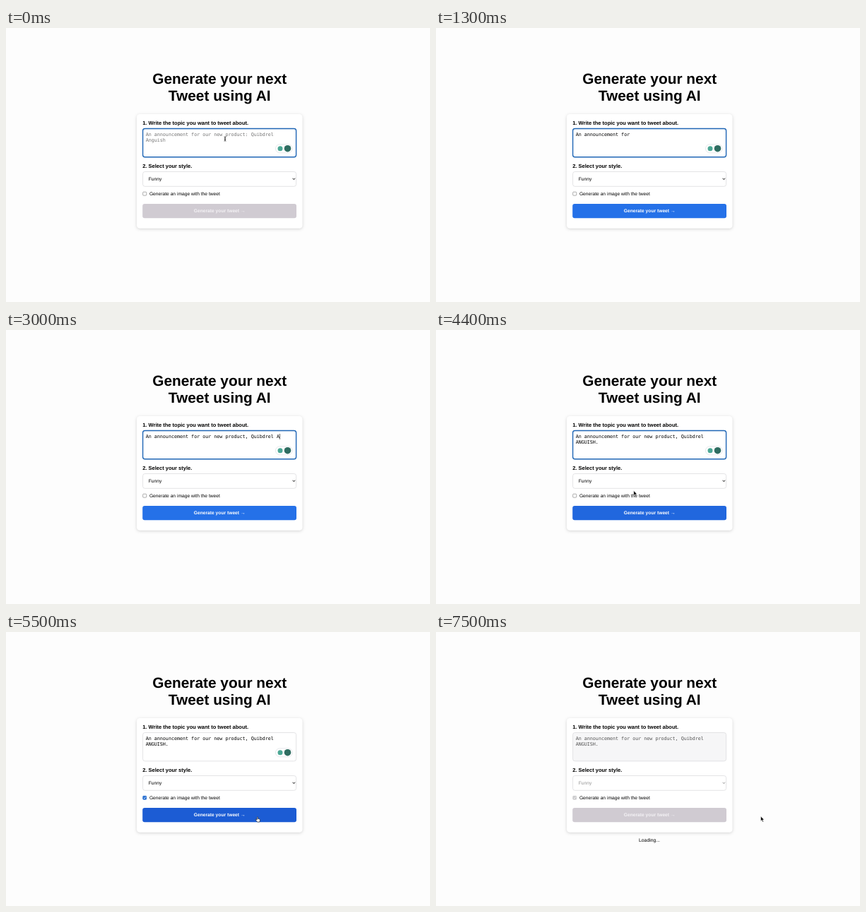
Write an HTML page that moves like this. It is 600 by 388 pixels and loops after 8 s.

```html
<!DOCTYPE html>
<html lang="en">
<head>
<meta charset="utf-8">
<title>Tweet generator</title>
<style>
  html, body { margin: 0; width: 100%; height: 100%; overflow: hidden; background: #fdfdfd; }
  svg { display: block; width: 600px; height: 388px; }
  text { font: 6.7px "Liberation Sans", Arial, sans-serif; text-rendering: geometricPrecision; white-space: pre; }
  .title { font-size: 20.85px; font-weight: 700; text-anchor: middle; }
  .label { font-size: 7.5px; font-weight: 700; }
  .mono { font-family: "DejaVu Sans Mono", monospace; }
  .middle { text-anchor: middle; }
  .menu text { font-size: 6.8px; }
  #card { filter: drop-shadow(0 1px 2.2px rgba(0, 0, 0, .17)); }
  #menu { filter: drop-shadow(0 1px 2px rgba(0, 0, 0, .35)); }
</style>
</head>
<body>
<svg viewBox="0 0 600 388" xmlns="http://www.w3.org/2000/svg">
  <rect width="600" height="388" fill="#fdfdfd"/>
  <text class="title" x="302.2" y="78.9">Generate your next</text>
  <text class="title" x="302.2" y="103.1">Tweet using AI</text>

  <rect id="card" x="185" y="122" width="234.5" height="161.8" rx="4.5" fill="#fff"/>
  <text class="label" x="193.2" y="136.6">1. Write the topic you want to tweet about.</text>
  <rect id="area" x="193.6" y="142.5" width="217" height="40.3" rx="3"/>
  <text id="line1" class="mono" x="197.7" y="153.2"></text>
  <text id="line2" class="mono" x="197.7" y="161"></text>
  <rect id="caret" y="147" width=".6" height="7.8"/>
  <g id="helper">
    <rect x="381.4" y="164.8" width="23.8" height="12" rx="6" fill="#fff" stroke="#dcdfe3" stroke-width=".7"/>
    <circle cx="388" cy="170.8" r="3.5" fill="#4ba794"/>
    <circle cx="398.5" cy="170.7" r="4.8" fill="#2f6d61"/>
  </g>

  <text class="label" x="193.2" y="197.7">2. Select your style.</text>
  <rect x="193.6" y="203.5" width="217" height="20.8" rx="3" fill="#fff" stroke="#dcdcdf" stroke-width=".8"/>
  <g id="choice">
    <text x="201.7" y="216.2">Funny</text>
    <path d="M405.7 212.8l1.7 1.8 1.7-1.8" fill="none" stroke="#000" stroke-width="1"/>
  </g>

  <rect id="box" x="193.7" y="232.2" width="5" height="5" rx=".9" stroke-width=".6"/>
  <path id="tick" d="M194.8 234.8l1.1 1.2 1.8-2.5" fill="none" stroke="#fff" stroke-width=".8"/>
  <text x="202.9" y="237.2">Generate an image with the tweet</text>

  <rect id="button" x="193.2" y="249" width="217.8" height="20.2" rx="3"/>
  <text id="buttonText" class="middle" x="302.2" y="261.4" style="font-weight:700">Generate your tweet →</text>
  <text id="loading" class="middle" x="302" y="296.6" style="font-size:6.8px">Loading...</text>

  <g id="menu" class="menu">
    <rect x="190" y="206.6" width="217.6" height="37.4" rx="3" fill="#dcdcdd"/>
    <rect x="192" y="209.2" width="213.8" height="10.6" rx="2" fill="#258dee"/>
    <path d="M194.2 214.6l1.4 1.8 2.4-4" fill="none" stroke="#fff" stroke-width=".9"/>
    <text x="200" y="217" fill="#fff">Funny</text>
    <text x="200" y="227.6">Inspirational</text>
    <text x="200" y="238.2">Casual</text>
  </g>

  <g id="pointer">
    <path id="arrow" d="M0 0v6.7l1.5-1.4 1.1 2.6 1.2-.5-1.1-2.5h2z" fill="#000" stroke="#fff" stroke-width=".5"/>
    <path id="hand" d="M-.8-2.5c0-1 1.3-1 1.3 0v2l2.4.6q.8.3.6 1.2l-.6 2.7h-3.3l-2.4-3q-.2-1 .8-.8l1.2.8z" fill="#fff" stroke="#111" stroke-width=".6"/>
    <path id="beam" d="M-1.4-3.2q1.4 0 1.4.8v4.8q0 .8-1.4.8M1.4-3.2q-1.4 0-1.4.8v4.8q0 .8 1.4.8M-.8.9h1.6" fill="none" stroke="#222" stroke-width=".7"/>
  </g>
</svg>
<script>
const LOOP = 8000, STEP = 100, CHAR = 4.034, COLUMNS = 51;
const HINT = ["An announcement for our new product: Quibdrel", "Anguish"];
const TOPIC = "An announcement for our new product, Quibdrel ANGUISH.";

const GREY = [208, 203, 210], BLUE = [37, 113, 232], HOVER = [28, 92, 212];
const typing = [[0, [0]], [100, [1]], [1300, [19.5]], [3000, [47]], [3700, [54]]];
const buttonColor = [
  [0, GREY], [100, GREY], [300, BLUE], [3900, BLUE], [4100, HOVER], [4300, HOVER],
  [4500, BLUE], [5300, BLUE], [5450, HOVER], [5700, HOVER], [5900, GREY]
];
const mouse = [
  [0, [310, 157]], [3700, [310, 157]], [3900, [303, 240]], [4100, [296, 266]], [4200, [292, 264]],
  [4400, [279.8, 227.6]], [4500, [273, 213]], [5000, [271.8, 212]], [5050, [271.8, 212]],
  [5200, [196, 234]], [5280, [196, 234]], [5400, [330, 259]], [5500, [356, 265]],
  [5700, [356, 265]], [6100, [459.6, 261]]
];
const menuOpacity = [[0, [0]], [4450, [0]], [4500, [1]], [4900, [1]], [5000, [.72]], [5150, [0]]];

const el = Object.fromEntries([...document.querySelectorAll("[id]")].map(node => [node.id, node]));
const set = (id, attrs) => {
  for (const name in attrs) el[id].setAttribute(name, attrs[name]);
};
const show = (id, on) => set(id, { visibility: on ? "visible" : "hidden" });

function track(keys, t) {
  const next = keys.findIndex(([time]) => time > t);
  if (next < 0) return keys[keys.length - 1][1];
  const [t0, from] = keys[next - 1], [t1, to] = keys[next];
  return from.map((v, i) => v + (to[i] - v) * (t - t0) / (t1 - t0));
}

function wrap(text) {
  if (text.length <= COLUMNS) return [text, ""];
  const cut = text.lastIndexOf(" ");
  return [text.slice(0, cut), text.slice(cut + 1)];
}

function drawTopic(t, focused, busy) {
  const count = Math.floor(track(typing, t)[0]);
  const lines = count ? wrap(TOPIC.slice(0, count)) : HINT;
  const fill = !count ? "#757575" : busy ? "#555" : "#000";
  lines.forEach((line, i) => {
    el["line" + (i + 1)].textContent = line;
    set("line" + (i + 1), { fill });
  });
  const row = lines[1] ? 1 : 0;
  set("caret", { x: 197.7 + lines[row].length * CHAR, y: 147 + row * 7.8 });
  show("caret", focused && count && (t + 300) % 1000 < 500);
  set("area", {
    fill: busy ? "#f6f6f7" : "#fff",
    stroke: focused ? "#1f66b5" : "#dcdcdf",
    "stroke-width": focused ? 1.4 : .8
  });
}

function drawPointer(t, busy) {
  const [x, y] = track(mouse, t);
  const inside = x > 193 && x < 411;
  const beam = inside && y > 142 && y < 183;
  const hand = inside && y > 249 && y < 269 && !busy;
  set("pointer", { transform: `translate(${x} ${y})` });
  const visible = t < 100 || t >= 3700;
  show("beam", visible && beam);
  show("hand", visible && hand);
  show("arrow", visible && !beam && !hand);
}

function draw(t) {
  const focused = t < 4500, checked = t >= 5300, busy = t >= 5700;
  drawTopic(t, focused, busy);
  show("helper", !busy);
  set("choice", { opacity: busy ? .42 : 1 });
  set("box", {
    fill: !checked ? "#fff" : busy ? "#c9c9cb" : "#1d68cf",
    stroke: !checked ? "#777" : busy ? "#c9c9cb" : "#1d68cf"
  });
  show("tick", checked);
  set("button", { fill: `rgb(${track(buttonColor, t).map(Math.round)})` });
  set("buttonText", { fill: t < 100 || busy ? "#f4f2f5" : "#fff" });
  show("loading", busy);
  set("menu", { opacity: track(menuOpacity, t)[0] });
  drawPointer(t, busy);
}

const start = performance.now();
function tick() {
  const t = (performance.now() - start) % LOOP;
  draw(Math.floor(t / STEP) * STEP);
  requestAnimationFrame(tick);
}
tick();
</script>
</body>
</html>
```
